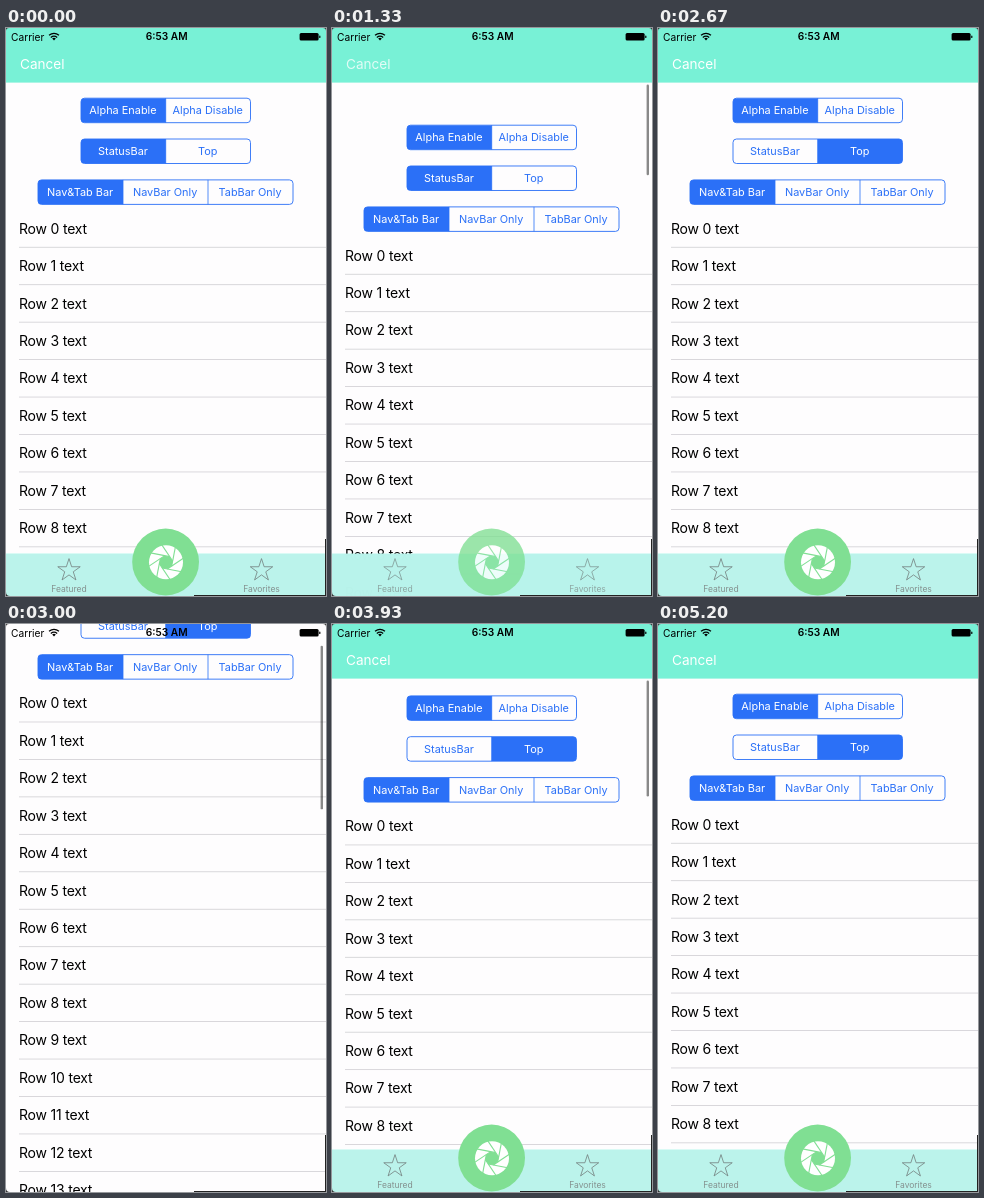
Write an HTML page that moves like this. It is 320 px wide and 568 px high and loops after 5.27 s.

```html
<!DOCTYPE html>
<html lang="en">
<head>
<meta charset="utf-8">
<title>Shy bars</title>
<style>
  html, body { margin: 0; width: 100%; height: 100%; overflow: hidden; background: #fefdfe; }
  svg { display: block; width: 100vw; height: 100vh; font-family: Inter, Roboto, sans-serif; }
  .row { font-size: 14px; letter-spacing: -.2px; }
  .seg { font-size: 10.9px; text-anchor: middle; }
  .tab { font-size: 8.5px; text-anchor: middle; fill: #84918f; }
  .status { font-size: 10.2px; }
</style>
</head>
<body>
<svg id="stage" viewBox="0 0 320 568"></svg>
<script>
const LOOP = 5270, TOP_TAP = 2340;
const STATUS_H = 17.2, NAV_BOTTOM = 54.6, TAB_TOP = 525.7, ROW_H = 37.45, CONTENT_H = 1888;
const BLUE = '#2b70f7', MINT = '#78f1d6', GREEN = '#80df93';

const stage = document.getElementById('stage');

function add(parent, tag, attrs = {}, text = '') {
  const el = document.createElementNS('http://www.w3.org/2000/svg', tag);
  set(el, attrs);
  el.textContent = text;
  return parent.appendChild(el);
}

function set(el, attrs) {
  for (const name in attrs) el.setAttribute(name, attrs[name]);
}

const rect = (parent, x, y, width, height, fill, more = {}) =>
  add(parent, 'rect', { x, y, width, height, fill, ...more });
const label = (parent, x, y, text, more = {}) => add(parent, 'text', { x, y, ...more }, text);
const group = parent => add(parent, 'g');

// Smooth keyframes: a monotone cubic through [time, value] points.
function track(points) {
  const slope = i => (points[i + 1][1] - points[i][1]) / (points[i + 1][0] - points[i][0]);
  const tangents = points.map((p, i) => {
    if (!i || i === points.length - 1) return 0;
    const a = slope(i - 1), b = slope(i);
    return a * b > 0 ? 2 * a * b / (a + b) : 0;
  });
  return t => {
    if (t <= points[0][0]) return points[0][1];
    const next = points.findIndex(p => p[0] > t);
    if (next < 0) return points[points.length - 1][1];
    const i = next - 1, [t0, v0] = points[i], [t1, v1] = points[next];
    const d = t1 - t0, u = (t - t0) / d, w = 1 - u;
    return v0 * (1 + 2 * u) * w * w + tangents[i] * d * u * w * w
         + v1 * u * u * (3 - 2 * u) - tangents[next] * d * u * u * w;
  };
}

const scrollAt = track([
  [130, 0], [330, 60], [530, 170], [730, 244.2], [870, 262], [1000, 215], [1150, 70],
  [1250, -10], [1330, -27], [1480, -10], [1700, 0],
  [2730, 0], [2900, 60], [3080, 150], [3200, 130], [3350, 65], [3470, 15.9],
  [3600, -9], [3930, -1.7], [4100, 0]
]);
const hideAt = track([
  [130, 0], [400, 1], [960, 1], [1150, 0],
  [2760, 0], [2960, 1], [3200, 1], [3380, 0]
]);
const fadeAt = track([
  [130, 1], [380, 0], [1000, 0], [1330, .78], [1480, 1],
  [2760, 1], [2930, 0], [3230, 0], [3470, .72], [3620, 1]
]);
const indicatorAt = track([
  [130, 0], [200, 1], [1950, 1], [2200, 0],
  [2730, 0], [2800, 1], [4250, 1], [4500, 0]
]);

function segmented(parent, x, y, width, names) {
  const w = width / names.length, h = 24.5;
  const cells = names.map((name, i) => ({
    box: rect(parent, x + i * w, y, w, h, BLUE),
    text: label(parent, x + (i + .5) * w - .4, y + 16.2, name, { class: 'seg' })
  }));
  cells.slice(1).forEach((_, i) => rect(parent, x + (i + 1) * w - .4, y, .8, h, BLUE));
  const clip = add(add(stage, 'defs'), 'clipPath', { id: 'seg' + y });
  rect(clip, x, y, width, h, '#000', { rx: 3.5 });
  cells.forEach(c => set(c.box, { 'clip-path': `url(#seg${y})` }));
  rect(parent, x, y, width, h, 'none', { rx: 3.5, stroke: BLUE, 'stroke-width': .9 });
  return index => cells.forEach((c, i) => {
    set(c.box, { 'fill-opacity': i === index ? 1 : 0 });
    set(c.text, { fill: i === index ? '#fff' : BLUE });
  });
}

function polar(cx, cy, r, angle) {
  return [cx + r * Math.cos(angle), cy + r * Math.sin(angle)];
}

function star(parent, cx, cy) {
  const points = Array.from({ length: 10 }, (_, i) =>
    polar(cx, cy, i % 2 ? 4.5 : 11.8, (i / 5 - .5) * Math.PI));
  add(parent, 'polygon', { points: points.join(' '), fill: 'none', stroke: '#737f7e', 'stroke-width': .8 });
}

function aperture(parent, cx, cy) {
  const blades = 8, step = 2 * Math.PI / blades;
  add(parent, 'circle', { cx, cy, r: 17, fill: '#fff' });
  const corners = Array.from({ length: blades }, (_, i) => polar(cx, cy, 6.8, -i * step - .2));
  add(parent, 'polygon', { points: corners.join(' '), fill: GREEN });
  corners.forEach(([x, y], i) => {
    const [px, py] = corners[(i + blades - 1) % blades];
    const k = 14.5 / Math.hypot(x - px, y - py);
    add(parent, 'path', {
      d: `M${px} ${py}L${x + (x - px) * k} ${y + (y - py) * k}`, stroke: GREEN, 'stroke-width': 1.1
    });
  });
}

rect(stage, 0, 0, 320, 568, '#fefdfe');

const content = group(stage);
segmented(content, 75, 70.2, 169.5, ['Alpha Enable', 'Alpha Disable'])(0);
const selectEdge = segmented(content, 75, 111, 169.5, ['StatusBar', 'Top']);
segmented(content, 32, 151.9, 255, ['Nav&Tab Bar', 'NavBar Only', 'TabBar Only'])(0);
for (let i = 0; i < 47; i++) {
  const y = 181.8 + i * ROW_H;
  label(content, 13, y + 23.8, `Row ${i} text`, { class: 'row' });
  rect(content, 13, y + ROW_H - .4, 307, .8, '#d0cfd3');
}

const indicator = rect(stage, 314.6, 0, 2.4, 0, '#000', { rx: 1.2 });

const tabBar = group(stage);
rect(tabBar, 0, TAB_TOP, 320, 43, '#aef6ec', { 'fill-opacity': .96 });
const tabItems = group(tabBar);
rect(tabItems, 0, TAB_TOP, 320, 43, '#bbf3eb');
[[63, 'Featured'], [255.5, 'Favorites']].forEach(([x, name]) => {
  star(tabItems, x, 542.4);
  label(tabItems, x, 564.4, name, { class: 'tab' });
});
add(tabItems, 'circle', { cx: 159.6, cy: 534, r: 33.4, fill: GREEN });
aperture(tabItems, 160, 534.3);

const navBar = group(stage);
rect(navBar, 0, -40, 320, NAV_BOTTOM + 40, MINT);
const cancel = label(navBar, 14, 41, 'Cancel', { fill: '#fff', 'font-size': 13.6 });

label(stage, 5, 12.5, 'Carrier', { class: 'status' });
label(stage, 160.7, 12.4, '6:53 AM', { class: 'status', 'font-weight': 600, 'text-anchor': 'middle' });
[[5, 7.2], [3.2, 9.4]].forEach(([w, y]) => add(stage, 'path', {
  d: `M${48 - w} ${y}Q48 ${y - w * .75} ${48 + w} ${y}`, fill: 'none', stroke: '#000', 'stroke-width': 1.3
}));
add(stage, 'path', { d: 'M46.2 10.4Q48 9 49.8 10.4L48 12.4Z' });
rect(stage, 293.6, 4.9, 19, 7.6, '#000', { rx: 1.5 });
rect(stage, 313.2, 7.4, 1.2, 2.6, '#000', { rx: .6 });

// Dark slivers at the edges of the screen.
rect(stage, 319, 511, 1, 57, '#222');
rect(stage, 188, 567, 132, 1, '#222');
add(stage, 'path', { d: 'M0 564Q0 568 4 568H0ZM0 3Q0 0 3 0H0ZM320 3Q320 0 317 0H320Z', fill: '#333' });

function render(t) {
  const scroll = scrollAt(t), hide = hideAt(t), fade = fadeAt(t);
  const atTop = t >= TOP_TAP;
  const navShift = hide * (atTop ? NAV_BOTTOM : NAV_BOTTOM - STATUS_H);
  const tabShift = hide * 68;

  selectEdge(atTop ? 1 : 0);
  set(content, { transform: `translate(0 ${-scroll})` });
  set(navBar, { transform: `translate(0 ${-navShift})` });
  set(tabBar, { transform: `translate(0 ${tabShift})` });
  set(cancel, { opacity: fade });
  set(tabItems, { opacity: fade });

  const top = NAV_BOTTOM - navShift;
  const visible = Math.min(556, TAB_TOP + tabShift) - top;
  const ratio = visible / CONTENT_H;
  set(indicator, {
    y: top + 2 + Math.max(0, scroll - navShift) * ratio,
    height: Math.max(8, visible * ratio + Math.min(0, scroll)),
    opacity: .46 * indicatorAt(t)
  });
}

const start = performance.now();
function tick() {
  render((performance.now() - start) % LOOP);
  requestAnimationFrame(tick);
}
tick();
</script>
</body>
</html>
```
